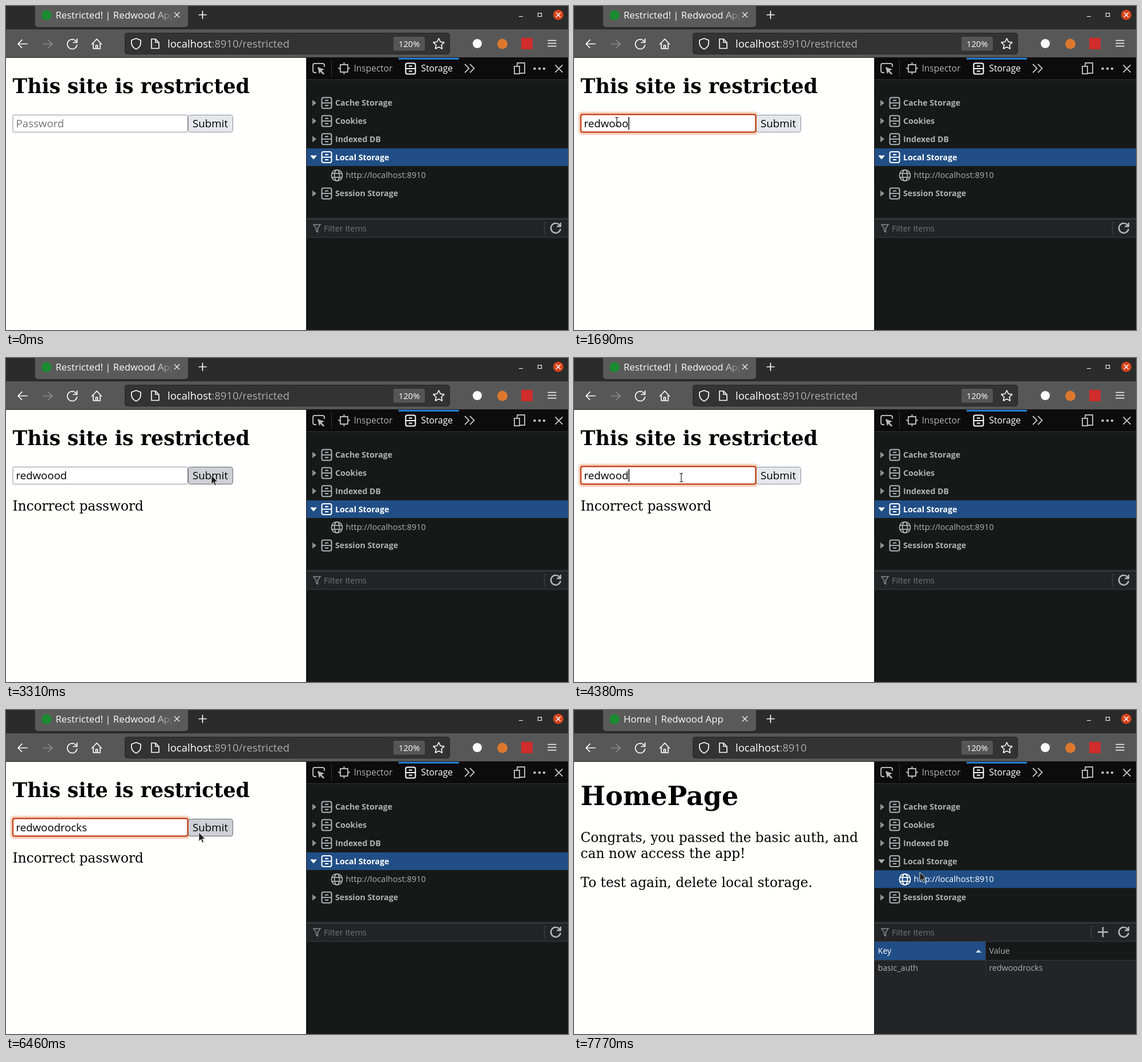
Recreate the animation shown at these times as an HTML page. Size 985 by 569 pixels, loop 8000 ms.

```html
<!DOCTYPE html>
<html lang="en">
<head>
<meta charset="utf-8">
<title>Password demo</title>
<style>
  html, body { margin: 0; width: 100%; height: 100%; overflow: hidden; background: #171918; }
  svg { display: block; width: 100vw; height: 100vh; }
  text { font: 14.2px "Open Sans", "Noto Sans", sans-serif; white-space: pre; }
  .page text { font: 23.25px "DejaVu Serif", serif; fill: #000; }
  .page .field { font: 18.75px "Open Sans", "Noto Sans", sans-serif; }
  .page .h1 { font-size: 46px; font-weight: bold; }
  .page .h2 { font-size: 34.8px; font-weight: bold; }
  .line { fill: none; stroke: #fbfbfe; stroke-width: 1.7; stroke-linejoin: round; stroke-linecap: round; }
  .thin { fill: none; stroke: #fbfbfe; stroke-width: 1.2; }
  .tool { fill: none; stroke: #b8b8ba; stroke-width: 2; stroke-linejoin: round; }
  .row { color: #b1b1b3; }
  .row.selected { color: #fff; }
  .row text { fill: currentColor; }
  .row.store text { font-weight: bold; }
</style>
</head>
<body>
<svg viewBox="0 0 985 569" preserveAspectRatio="none">
  <defs>
    <linearGradient id="fade" gradientUnits="userSpaceOnUse" x1="262" x2="293" y1="0" y2="0">
      <stop stop-color="#fbfbfe"/><stop offset="1" stop-color="#5a5a5a"/>
    </linearGradient>
    <g id="drawer" fill="none" stroke="currentColor" stroke-width="2">
      <rect x="-8.5" y="-9.5" width="17" height="19" rx="3"/>
      <path d="M-8.5 0H8.5M-3 -4.5H3M-3 4.5H3"/>
    </g>
    <g id="globe" fill="none" stroke="currentColor" stroke-width="1.8">
      <circle r="9.6"/><ellipse rx="4.4" ry="9.6"/><path d="M-9 -3.3H9M-9 3.3H9"/>
    </g>
    <path id="reload" d="M7.3 -4.3A8.5 8.5 0 1 0 8.4 1.500M8.500 -9.500V-3H2" fill="none"/>
  </defs>

  <!-- Window and tab -->
  <rect width="985" height="42" fill="#2b2b2b"/>
  <rect x="51" y="-8" width="268" height="45" rx="5" fill="#5a5a5a"/>
  <circle cx="71" cy="16" r="9" fill="#1c8a30"/>
  <text id="title" x="87" y="22" fill="url(#fade)" style="font-size:16.8px"></text>
  <path class="thin" d="M295 11l9 9m0-9l-9 9M899 18.500h7M932.500 12.500h6v6h-6z"/>
  <path class="line" d="M338 15.500h13M344.500 9v13"/>
  <circle cx="968" cy="15.500" r="9" fill="#d9441c"/>
  <path class="line" d="M964.500 12l7 7m0-7l-7 7"/>

  <!-- Navigation bar -->
  <rect y="41" width="985" height="50" fill="#575757"/>
  <path d="M0 90.500H985" stroke="#1c1c1c"/>
  <rect x="208.500" y="47.500" width="569" height="37" rx="4" fill="#333" stroke="#242424"/>
  <path class="line" d="M37 66.500H21m7-7l-7 7 7 7"/>
  <path class="line" style="stroke:#8d8d8d" d="M65 66.500H81m-7-7l7 7-7 7"/>
  <use href="#reload" class="line" x="116" y="67"/>
  <path class="line" d="M150.500 67l8.500-9 8.500 9M153 65v10h12V65M157.500 75v-6h3v6"/>
  <path class="line" d="M228 57l8 3v5c0 5-3 8.500-8 11-5-2.500-8-6-8-11v-5z"/>
  <path class="line" d="M255 58h7l6 6v10.500h-13zM262 58v6h6"/>
  <text x="283" y="72.500" style="font-size:18.5px" fill="#fff">localhost<tspan id="path" fill="#aaa"></tspan></text>
  <rect x="679" y="54" width="55" height="24.500" rx="3" fill="#555"/>
  <text x="688" y="72" style="font-size:14.7px" fill="#fbfbfe">120%</text>
  <path class="line" d="M758.500 57l2.900 6 6.600.9-4.800 4.600 1.200 6.600-5.900-3.100-5.900 3.100 1.200-6.600-4.800-4.600 6.600-.9z"/>
  <circle cx="826" cy="66" r="8" fill="#fbfbfe"/>
  <circle cx="870" cy="66.500" r="9" fill="#dc792c"/>
  <rect x="903" y="56" width="20" height="20" fill="#d02c2c"/>
  <path class="line" d="M950 60.500h14m-14 5h14m-14 5h14"/>

  <!-- Web page -->
  <rect y="91" width="526" height="478" fill="#fffffe"/>
  <g class="page" id="login">
    <text class="h2" x="11.500" y="153">This site is restricted</text>
    <rect id="halo" x="7.500" y="185.500" width="315" height="41" rx="6" fill="#f6d5c3"/>
    <rect id="button" x="319.500" y="191.500" width="78" height="30" rx="4"/>
    <text class="field" x="327" y="213">Submit</text>
    <rect id="input" fill="#fff"/>
    <text class="field" id="value" x="17.500" y="213"></text>
    <rect id="caret" y="195" width="1.500" height="22"/>
    <text id="error" x="11.500" y="267.500">Incorrect password</text>
  </g>
  <g class="page" id="home">
    <text class="h1" x="11.500" y="167">HomePage</text>
    <text x="11.500" y="232">Congrats, you passed the basic auth, and</text>
    <text x="11.500" y="260">can now access the app!</text>
    <text x="11.500" y="311">To test again, delete local storage.</text>
  </g>

  <!-- Developer tools -->
  <rect x="526" y="91" width="459" height="478" fill="#171918"/>
  <rect x="527" y="91" width="458" height="38" fill="#0c0c0d"/>
  <path d="M527 129.500H985M570.500 96V123" stroke="#38383d"/>
  <rect x="688" y="91" width="106" height="3" fill="#2181d4"/>
  <path class="tool" d="M544 117h-3q-3 0-3-3v-10q0-3 3-3h14q3 0 3 3v3"/>
  <path d="M546 107l12 4.500-5 2 5 5-2 2-5-5-2 4z" fill="#b8b8ba"/>
  <path class="tool" d="M586 103h13v13h-13zM592.500 103v-4m0 17v4M586 109.500h-4m17 0h4"/>
  <text x="609.500" y="115" style="font-size:15.5px" fill="#b1b1b3">Inspector</text>
  <use href="#drawer" x="709" y="110" color="#fff"/>
  <text x="727.500" y="115" style="font-size:15.6px" fill="#fff">Storage</text>
  <path class="tool" d="M804 102l7.500 7.500-7.500 7.500m9-15l7.500 7.500-7.500 7.500"/>
  <path class="tool" d="M896 106v-6h13v18h-8M891 106h9v13h-9z"/>
  <g fill="#b8b8ba"><circle cx="926.500" cy="110" r="2.300"/><circle cx="935" cy="110" r="2.300"/><circle cx="943" cy="110" r="2.300"/></g>
  <path class="tool" d="M962.500 103.500l13 13m0-13l-13 13"/>
  <rect id="highlight" x="527" width="458" height="31" fill="#214e86"/>
  <g id="tree"></g>
  <rect x="527" y="372.500" width="458" height="2.500" fill="#38393c"/>
  <rect x="527" y="375" width="458" height="31" fill="#232427"/>
  <path d="M527 406.500H985" stroke="#38383d"/>
  <path d="M539 384h12l-4.500 6v7l-3-2v-5z" fill="none" stroke="#8a8a8c" stroke-width="1.500"/>
  <text x="557" y="395.500" style="font-size:14.4px" fill="#747477">Filter Items</text>
  <path id="divider" d="M0 379V401" stroke="#48484d"/>
  <use href="#reload" x="963.500" y="390" stroke="#b8b8ba" stroke-width="2.500"/>
  <g id="table">
    <path d="M918 390h18M927 381v18" stroke="#b8b8ba" stroke-width="2.500"/>
    <rect x="527" y="407" width="458" height="162" fill="#232427"/>
    <rect x="527" y="407" width="458" height="32" fill="#171918"/>
    <rect x="527" y="407" width="194" height="32" fill="#214e86"/>
    <path d="M527 439.500H985M721.500 407V464" stroke="#38383d"/>
    <path d="M704 426l5-5 5 5z" fill="#dfe6f0"/>
    <text x="532.500" y="427.500" fill="#fff">Key</text>
    <g fill="#b1b1b3">
      <text x="727.500" y="427.500">Value</text>
      <text x="532.500" y="457.500">basic_auth</text>
      <text x="727.500" y="457.500">redwoodrocks</text>
    </g>
  </g>

  <path id="arrow" d="M0 0V15.500l3.600-3.300 2.500 5.600 2.500-1.100-2.500-5.500h4.900z" fill="#1c1c1c" stroke="#eee" stroke-width=".9"/>
  <path id="ibeam" d="M-3 -7.500h2l1 1 1-1h2M0 -6.500V6.500M-3 7.500h2l1-1 1 1h2" fill="none" stroke="#222" stroke-width="1.200"/>
</svg>

<script>
const LOOP = 8000, TICK = 1000 / 13;
const $ = id => document.getElementById(id);
const show = (id, on) => $(id).style.display = on ? '' : 'none';
const set = (id, attrs) => { for (const k in attrs) $(id).setAttribute(k, attrs[k]); };
const within = (t, a, b) => t >= a && t < b;
// Value of the last [time, value] step that has started.
const stepAt = (steps, t) => steps.reduce((v, [start, next]) => t >= start ? next : v, steps[0][1]);

const typed = [
  [0, ''], [1080, 're'], [1230, 'red'], [1310, 'redw'], [1460, 'redwo'], [1620, 'redwoo'],
  [1690, 'redwooo'], [1770, 'redwoood'], [4150, 'redwooo'], [4310, 'redwoo'], [4380, 'redwood'],
  [5080, 'redwoodr'], [5230, 'redwoodro'], [5310, 'redwoodroc'], [5380, 'redwoodrock'], [5460, 'redwoodrocks']
];
const caretOn = [
  [0, false], [540, true], [2390, false], [2920, true], [3150, false],
  [3690, true], [4920, false], [5080, true], [6150, false]
];
// Pointer moves: start, end, x, y
const moves = [
  [75, 380, 75, 203], [2230, 2620, 321, 203], [2620, 2770, 372, 205], [2850, 3000, 379, 207],
  [3230, 3310, 360, 206], [3390, 3690, 188, 210], [5850, 5920, 306, 238], [5920, 6000, 259, 240],
  [6080, 6230, 260, 245], [6310, 6460, 338, 215], [6690, 6770, 345, 211], [6920, 7150, 422, 225],
  [7230, 7460, 576, 277], [7620, 7690, 606, 285]
];

function pointerAt(t) {
  // The screen was sampled at 13 pictures a second.
  const now = Math.floor((t + 5) / TICK) * TICK;
  let x = 295, y = 14;
  for (const [start, end, toX, toY] of moves) {
    const p = Math.min(1, Math.max(0, (now - start) / (end - start - 5)));
    x += (toX - x) * p;
    y += (toY - y) * p;
  }
  return { x, y };
}

const storeRow = (name, y, open) => `<g class="row store" id="${name.split(' ')[0]}">
  <path d="${open ? `M533 ${y - 3}h12l-6 7z` : `M537 ${y - 5.5}l7 5.5-7 5.5z`}" fill="currentColor" opacity="${open ? 1 : .8}"/>
  <use href="#drawer" x="562" y="${y}"/><text x="577" y="${y + 5}">${name}</text></g>`;
$('tree').innerHTML = ['Cache Storage', 'Cookies', 'Indexed DB', 'Local Storage']
  .map((name, i) => storeRow(name, 170.2 + i * 31.8, i === 3)).join('') +
  '<g class="row" id="origin"><use href="#globe" x="580" y="297.500"/>' +
  '<text x="595.500" y="302" style="font-size:14.5px">http://localhost:8910</text></g>' +
  storeRow('Session Storage', 329.2);

function drawLogin(t, x, y) {
  const focused = within(t, 540, 3150) || within(t, 3690, 6620);
  const inField = within(x, 12, 319) && within(y, 191, 222);
  const hover = within(x, 322, 398) && within(y, 191, 222);
  const pressed = within(t, 3150, 3230) || t >= 6620;
  const text = stepAt(typed, t);

  show('halo', focused);
  set('input', focused
    ? { x: 12, y: 190.5, width: 306.5, height: 31, rx: 3, stroke: '#c9471f', 'stroke-width': 2.5 }
    : { x: 12, y: 191.5, width: 306.5, height: 30, rx: 2, stroke: inField ? '#676774' : '#8f8f9d', 'stroke-width': 1 });
  set('button', {
    fill: pressed ? '#b1b3b9' : hover ? '#cdd0d4' : '#e5e8eb',
    stroke: hover ? '#676774' : '#8f8f9d'
  });
  $('value').textContent = text || 'Password';
  $('value').style.fill = text ? '#000' : '#757575';
  set('caret', { x: 17.5 + (text ? $('value').getComputedTextLength() : 0) });
  show('caret', stepAt(caretOn, t));
  show('error', t >= 3230);
  return inField;
}

function draw(t) {
  const { x, y } = pointerAt(t);
  const home = t >= 6690, selected = t >= 7690, stored = t >= 7770;

  show('login', !home);
  show('home', home);
  const inField = !home && drawLogin(t, x, y);

  $('title').textContent = t < 7000 ? 'Restricted! | Redwood App' : 'Home | Redwood App';
  $('path').textContent = home ? ':8910' : ':8910/restricted';

  set('highlight', { y: selected ? 281.5 : 250 });
  $('Local').classList.toggle('selected', !selected);
  $('origin').classList.toggle('selected', selected);
  show('table', stored);
  set('divider', { transform: `translate(${stored ? 906.5 : 943.5})` });

  const textCursor = inField || (home && t >= 6770 && x < 400);
  const transform = `translate(${x} ${y})`;
  set('arrow', { transform });
  set('ibeam', { transform });
  show('arrow', t >= 150 && !textCursor);
  show('ibeam', t >= 150 && textCursor);
}

const began = performance.now();
function frame() {
  draw((performance.now() - began) % LOOP);
  requestAnimationFrame(frame);
}
frame();
</script>
</body>
</html>
```
